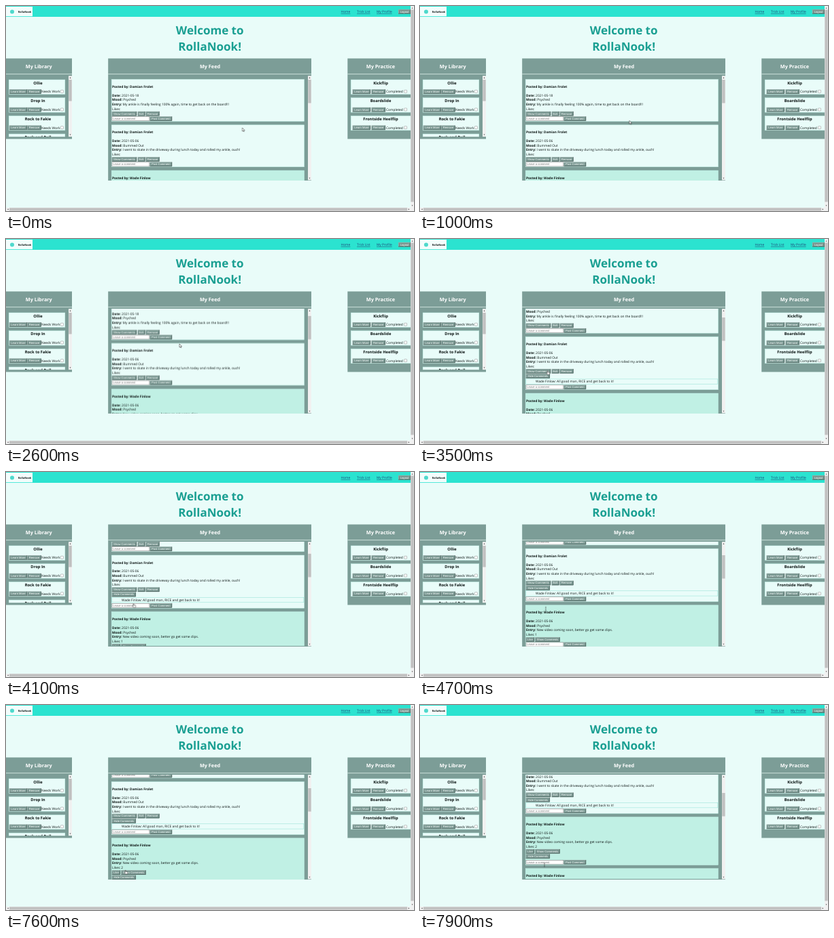
An HTML page for the animation above (8000 ms loop, 600 by 303 pixels).

```html
<!DOCTYPE html>
<html lang="en">
<head>
<meta charset="utf-8">
<title>RollaNook</title>
<style>
html, body { margin: 0; width: 100%; height: 100%; overflow: hidden; background: #e9fcf9; }
svg { display: block; width: 100vw; height: 100vh; }
text { font: 4.85px "Open Sans", "Noto Sans", sans-serif; fill: #0c1413; text-rendering: geometricPrecision; white-space: pre; }
.b { font-weight: 700; }
.mid { text-anchor: middle; }
.title { font-size: 17px; font-weight: 700; fill: #1a9f92; }
.head { font-size: 7.3px; font-weight: 700; fill: #fff; }
.trick { font-size: 5.8px; font-weight: 700; }
.logo { font-size: 3.75px; font-weight: 700; }
.link { fill: #1d3f73; text-decoration: underline; }
.ui { font: 4.17px "Liberation Sans", Arial, sans-serif; fill: #fff; }
.hint { fill: #757575; }
.panel { fill: #7c9d97; }
.card { fill: #e9fcf9; stroke: #c4f3ea; stroke-width: .5; }
.mint { fill: #c0f0e4; }

/* One loop is 8 s, so 100 ms is 1.25% */
.scroll, .thumb, .pointer { animation: 8s linear infinite; }
.scroll { animation-name: scroll; }
.thumb { animation-name: thumb; }
.pointer { animation-name: point; }
@keyframes scroll {
  0% { transform: translateY(0); }
  31.25% { transform: translateY(0); animation-timing-function: ease-out; }
  33.75% { transform: translateY(-31.25px); }
  50% { transform: translateY(-31.25px); animation-timing-function: ease-out; }
  52.5% { transform: translateY(-62.5px); }
  96.25% { transform: translateY(-62.5px); animation-timing-function: ease-out; }
  98.5%, 100% { transform: translateY(-93.75px); }
}
@keyframes thumb {
  0% { transform: translateY(0); }
  31.25% { transform: translateY(0); animation-timing-function: ease-out; }
  33.75% { transform: translateY(7px); }
  50% { transform: translateY(7px); animation-timing-function: ease-out; }
  52.5% { transform: translateY(14px); }
  96.25% { transform: translateY(14px); animation-timing-function: ease-out; }
  98.5%, 100% { transform: translateY(21px); }
}
@keyframes point {
  0%, 1.25% { transform: translate(347.5px, 180px); }
  27.5%, 33.75% { transform: translate(255px, 155px); }
  38.75%, 57.5% { transform: translate(187.5px, 194.5px); }
  70%, 78.75% { transform: translate(162px, 245px); }
  83.75%, 95% { transform: translate(175.5px, 244px); }
  96.25%, 100% { transform: translate(183px, 233.5px); }
}

.thread, .grow2, .push2, .thanks, .grow3, .push3, .reply3,
.like1, .like2, .arrow, .hand, .beam { animation: 8s step-end infinite; }
.thread { animation-name: thread; }
.grow2 { animation-name: grow2; }
.push2 { animation-name: push2; }
.thanks { animation-name: thanks; }
.grow3 { animation-name: grow3; }
.push3 { animation-name: push3; }
.reply3 { animation-name: reply3; }
.like1 { animation-name: like1; }
.like2 { animation-name: like2; }
.arrow { animation-name: arrow; }
.hand { animation-name: hand; }
.beam { animation-name: beam; }
@keyframes thread { 0% { visibility: hidden; } 41.25%, 100% { visibility: visible; } }
@keyframes grow2 { 0% { height: 62px; } 41.25%, 100% { height: 78.2px; } }
@keyframes push2 { 0% { transform: none; } 41.25%, 100% { transform: translateY(16.2px); } }
@keyframes thanks { 0% { visibility: hidden; } 90%, 100% { visibility: visible; } }
@keyframes grow3 { 0% { height: 62px; } 90%, 100% { height: 71px; } }
@keyframes push3 { 0% { transform: none; } 90%, 100% { transform: translateY(9px); } }
@keyframes reply3 { 0% { transform: none; } 90%, 100% { transform: translateY(8.6px); } }
@keyframes like1 { 0% { visibility: visible; } 77.5%, 100% { visibility: hidden; } }
@keyframes like2 { 0% { visibility: hidden; } 77.5%, 100% { visibility: visible; } }
@keyframes arrow { 0% { visibility: visible; } 37.5% { visibility: hidden; } 60% { visibility: visible; } 68.75%, 100% { visibility: hidden; } }
@keyframes hand { 0% { visibility: hidden; } 37.5% { visibility: visible; } 53.75% { visibility: hidden; } 68.75% { visibility: visible; } 98.75%, 100% { visibility: hidden; } }
@keyframes beam { 0% { visibility: hidden; } 53.75% { visibility: visible; } 60% { visibility: hidden; } 98.75%, 100% { visibility: visible; } }
</style>
</head>
<body>
<svg id="stage" viewBox="0 0 600 303" xmlns="http://www.w3.org/2000/svg"></svg>
<script>
const rect = (x, y, w, h, fill, extra = '') =>
  `<rect x="${x}" y="${y}" width="${w}" height="${h}" fill="${fill}" ${extra}/>`;
const box = (x, y, w, h, cls) =>
  `<rect x="${x}" y="${y}" width="${w}" height="${h}" class="${cls}"/>`;
const text = (x, y, s, cls = '') => `<text x="${x}" y="${y}" class="${cls}">${s}</text>`;
const at = (y, body) => `<g transform="translate(0 ${y})">${body}</g>`;
const group = (cls, body) => `<g class="${cls}">${body}</g>`;
const tri = (x, y, dx, dy) =>
  `<path d="M${x + dx} ${y + dy}L${x - dx - dy} ${y - dy - dx}L${x - dx + dy} ${y - dy + dx}Z" fill="#505050"/>`;

function button(x, y, w, label) {
  const h = 6.5;
  return rect(x, y, w, h, '#76958f') +
    `<path d="M${x + .3} ${y + h}V${y + .3}H${x + w}" fill="none" stroke="#a9b8b5" stroke-width=".6"/>` +
    `<path d="M${x} ${y + h - .3}H${x + w - .3}V${y}" fill="none" stroke="#3f4f4c" stroke-width=".6"/>` +
    text(x + w / 2, y + 4.7, label, 'ui mid');
}

function scrollbar(x, top, bottom, thumbTop, thumbH, cls) {
  return rect(x, top, 5, bottom - top, '#f1f1f1') +
    tri(x + 2.5, top + 2.8, 0, -.9) + tri(x + 2.5, bottom - 2.8, 0, .9) +
    group(cls, rect(x + .3, thumbTop, 4.4, thumbH, '#c1c1c1'));
}

function panel(x, w, h, cx, title) {
  return box(x, 77.5, w, h, 'panel') + text(cx, 91.8, title, 'head mid') +
    rect(x, 100.2, w, .9, '#d3e6e2');
}

function trick(y, c, name) {
  return at(y, box(c.x, 0, c.w, 21.4, 'card') + text(c.cx, 6.6, name, 'trick mid') +
    button(c.learn, 14.2, 26.3, 'Learn More') + button(c.remove, 14.2, 20.4, 'Remove') +
    text(c.note, 19.2, c.label) +
    rect(c.check, 15.3, 4, 4, '#fff', 'rx=".6" stroke="#6d6d6d" stroke-width=".4"'));
}

const tricks = (names, c) => names.map((n, i) => trick(109 + i * 26.7, c, n)).join('');

const reply = y => rect(155.9, y + .2, 55, 6.1, '#fff', 'stroke="#666" stroke-width=".5"') +
  text(157.3, y + 4.7, 'Leave a comment', 'ui hint') + button(211.5, y, 32.6, 'Post Comment');

const field = (y, name, value) =>
  `<text x="156" y="${y}"><tspan class="b">${name}:</tspan> ${value}</text>`;

const ownButtons = button(155.7, 47.5, 36.4, 'Show Comments') +
  button(193.7, 47.5, 10.8, 'Edit') + button(205.6, 47.5, 20, 'Remove');
const otherButtons = button(155.7, 47.5, 12.4, 'Like') + button(169.3, 47.5, 36.4, 'Show Comments');
const hideButton = button(155.7, 54.8, 35.2, 'Hide Comments');

function post(y, p) {
  return at(y, `<rect x="155.2" y="0" width="283.3" height="62" class="card ${p.cls || ''}"/>` +
    text(156, 12.6, 'Posted by: ' + p.by, 'b') +
    field(25.5, 'Date', p.date) + field(32.1, 'Mood', p.mood) + field(38.7, 'Entry', p.entry) +
    text(156, 45.3, 'Likes:') + (p.likes || '') + p.buttons +
    (p.thread || '') + group(p.replyCls || '', reply(54.9)));
}

const me = 'Damian Frolet', pal = 'Wade Finlow';

const posts = post(108.4, {
  by: me, date: '2021-05-18', mood: 'Psyched', buttons: ownButtons,
  entry: 'My ankle is finally feeling 100% again, time to get back on the board!!!'
}) + post(175.8, {
  by: me, date: '2021-05-06', mood: 'Bummed Out', buttons: ownButtons,
  entry: 'I went to skate in the driveway during lunch today and rolled my ankle, ouch!',
  cls: 'grow2', replyCls: 'push2',
  thread: group('thread', hideButton +
    rect(155.9, 62.4, 281.9, 7.4, 'none', 'stroke="#8fe0d4" stroke-width=".5"') +
    text(170, 67.8, pal + ': All good man, RICE and get back to it!'))
}) + group('push2', post(243.1, {
  by: pal, date: '2021-05-06', mood: 'Psyched', buttons: otherButtons,
  entry: 'New video coming soon, better go get some clips.',
  cls: 'mint grow3', replyCls: 'reply3',
  likes: text(169.2, 45.3, '1', 'like1') + text(169.2, 45.3, '2', 'like2'),
  thread: group('thanks', hideButton)
}) + group('push3', post(310.2, {
  by: pal, date: '2021-05-05', mood: 'Psyched', buttons: otherButtons,
  entry: 'Out skating today.', cls: 'mint'
})));

const nav = rect(0, 0, 600, 16, '#2be3d0') + rect(0, 1, 39, 14.2, '#f3fdfc') +
  '<circle cx="9" cy="8.6" r="3" fill="#4fd9cc"/>' + text(17.8, 10, 'RollaNook', 'logo') +
  text(492.6, 10, 'Home', 'link') + text(516, 10, 'Trick List', 'link') +
  text(545, 10, 'My Profile', 'link') + button(577, 5, 18.2, 'Logout');

const library = panel(0, 97, 119, 48.3, 'My Library') +
  group('" clip-path="url(#side)', tricks(['Ollie', 'Drop In', 'Rock to Fakie', 'Rock and Roll'],
    { x: 4.2, w: 82.6, cx: 47, learn: 4.8, remove: 31.3, note: 52, check: 80.4, label: 'Needs Work' })) +
  scrollbar(92, 103.2, 193.2, 109, 31.5, '');

const practice = panel(502.3, 93, 119, 551, 'My Practice') +
  tricks(['Kickflip', 'Boardslide', 'Frontside Heelflip'],
    { x: 507.2, w: 90, cx: 551, learn: 509.7, remove: 537.5, note: 559, check: 585.5, label: 'Completed' });

const feed = panel(150.2, 298.8, 180.5, 300, 'My Feed') +
  `<g clip-path="url(#feed)">${group('scroll', posts)}</g>` +
  scrollbar(444, 103.2, 257.4, 109, 34.5, 'thumb');

const pageBars = scrollbar(595, 0, 298, 5.5, 284, '') + rect(0, 298, 600, 5, '#f1f1f1') +
  rect(5, 298.4, 585, 4.2, '#c1c1c1') + tri(2.8, 300.5, -.9, 0) + tri(592.5, 300.5, .9, 0);

const pointer = group('pointer',
  '<path class="arrow" d="M0 0V5.2L1.2 4.1L2 5.9L2.8 5.5L2 3.8H3.7Z" fill="#fff" stroke="#111" stroke-width=".45"/>' +
  '<path class="hand" d="M-.5 .4Q0-.3 .5 .4V2.2L3 2.7Q3.5 3 3.4 3.8L2.8 5.9H.1L-1.6 3.7Q-1.4 3-.5 3.7Z" fill="#fff" stroke="#111" stroke-width=".45"/>' +
  '<path class="beam" d="M-.8 0H.8M0 0V5M-.8 5H.8" fill="none" stroke="#222" stroke-width=".45"/>');

document.getElementById('stage').innerHTML =
  `<defs><clipPath id="side">${rect(0, 103.2, 92, 90, '#000')}</clipPath>` +
  `<clipPath id="feed">${rect(150, 103.2, 294, 154.2, '#000')}</clipPath></defs>` +
  rect(0, 0, 600, 303, '#e9fcf9') + nav +
  text(299.7, 41.8, 'Welcome to', 'title mid') + text(299.7, 65.7, 'RollaNook!', 'title mid') +
  library + feed + practice + pageBars + pointer;
</script>
</body>
</html>
```
